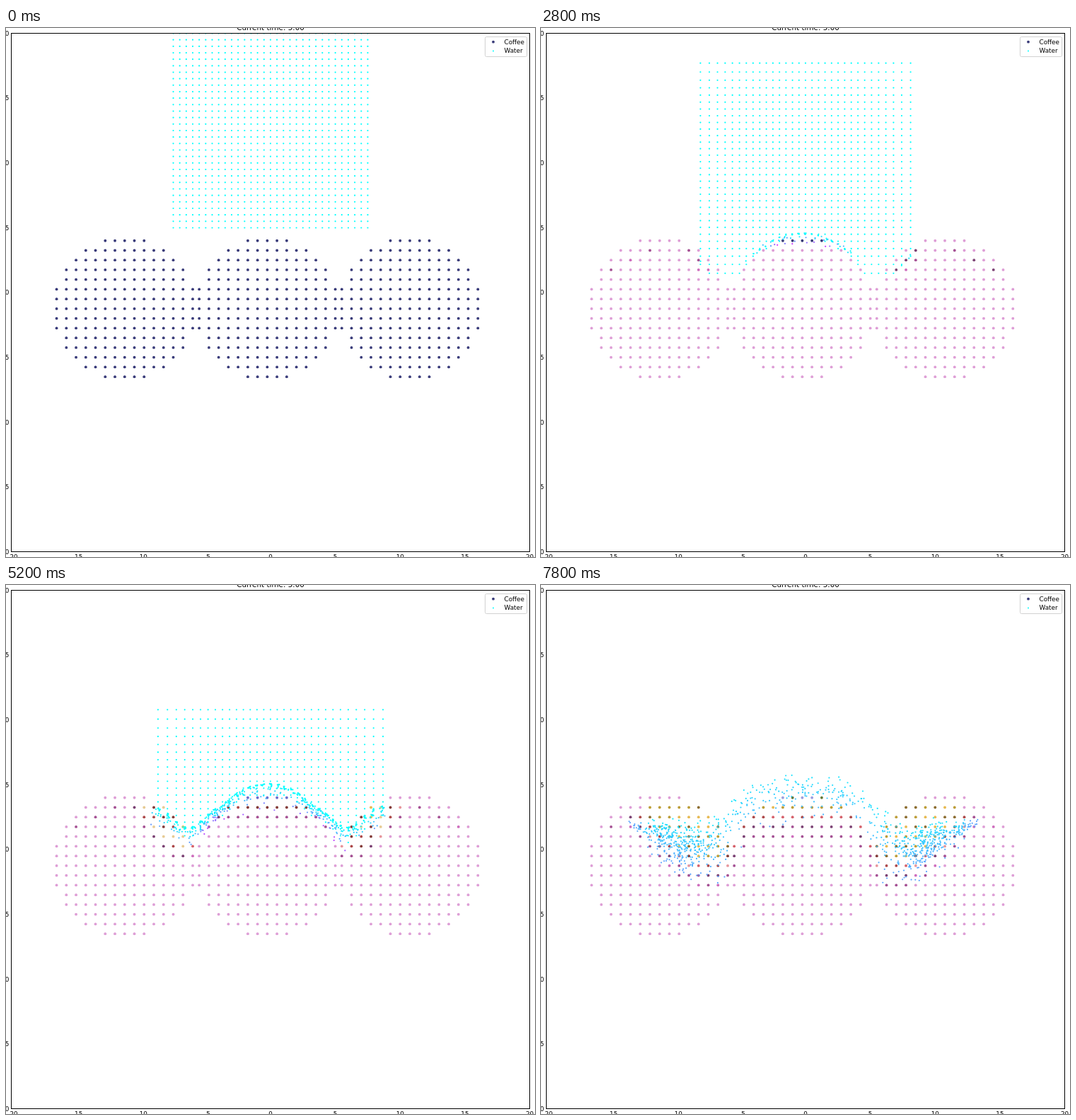
An HTML page with a canvas for the animation above (8000 ms loop, 748 px wide and 748 px high).

```html
<!DOCTYPE html>
<html lang="en">
<head>
<meta charset="utf-8">
<title>Coffee and water particles</title>
<style>
  html, body { margin: 0; width: 100%; height: 100%; overflow: hidden; background: #fff; }
  canvas, svg { position: absolute; left: 0; top: 0; width: 748px; height: 748px; }
  text { font: 8.8px "DejaVu Sans", sans-serif; }
  .title { font-size: 10.4px; }
</style>
</head>
<body>
<canvas id="stage" width="748" height="748"></canvas>
<svg id="axes" viewBox="0 0 748 748">
  <rect x="7.5" y="7.5" width="733" height="733" fill="none" stroke="#000"/>
  <text class="title" x="374" y="2.5" text-anchor="middle">Current time: 5.00</text>
  <rect x="677.5" y="12.5" width="59" height="28" rx="2" fill="#fff" fill-opacity=".8" stroke="#ccc" stroke-width=".9"/>
  <circle cx="689" cy="19.7" r="1.9" fill="#393b79"/>
  <circle cx="689" cy="32.6" r="1" fill="#0ff"/>
  <text x="704.5" y="22.7">Coffee</text>
  <text x="704.5" y="35.2">Water</text>
</svg>
<script>
const STEP = 200, LOOP = 8000, UNIT = 18.33, MID = 374, CREST = 370, END = 7.8;
const PALETTE = ('393b79 5254a3 6b6ecf 9c9ede 637939 8ca252 b5cf6b cedb9c 8c6d31 bd9e39 ' +
  'e7ba52 e7cb94 843c39 ad494a d6616b e7969c 7b4173 a55194 ce6dbd de9ed6').split(' ').map(c => '#' + c);
const ctx = document.getElementById('stage').getContext('2d');
const clamp = (v, lo = 0, hi = 1) => Math.min(hi, Math.max(lo, v));
const mix = (a, b, k) => a + (b - a) * k;
const bell = v => Math.exp(-v * v);
const offset = x => Math.abs(x - CREST);
const rebound = t => Math.max(0, t - 4.4);

let seed = 7;
function random() {
  seed = (seed * 1664525 + 1013904223) % 4294967296;
  return seed / 4294967296;
}

// Top of the disturbed water: a dome that swells and a valley that fills.
function upper(d, t) {
  const g = rebound(t);
  const top = 290 - 10 * g - 2 * g * g;
  const dome = mix(top, 311, clamp(d / (60 + 7 * g * g)) ** 2);
  return dome + 58 * clamp(1 - g / 1.8) * bell((d - 112) / 30) + Math.max(0, d - 200) / 2;
}

// How deep the water has soaked in, with a lobe growing on each side.
function lower(d, t) {
  const g = rebound(t), out = d - 115;
  const lobe = out < 0 ? bell(out / 25) : 1 - (out / (55 + 18 * g)) ** 2;
  return Math.max(upper(d, t), 284 + 9.5 * t + (55 + 5 * g) * lobe);
}

// Untouched block: falls under gravity while its rims spread apart.
function spread(k, t) {
  const reach = .4 + .82 * t;
  return 4.4 * t * t / (t + .3) * (Math.exp((k - 30) / reach) - Math.exp(-k / reach));
}
function falling(col, row, t) {
  return {
    x: MID + (col - 15) * UNIT / 2 + spread(col, t),
    y: 282.5 - row * UNIT / 2 + 7.34 * Math.max(0, t - .107) ** 2 - spread(row, t)
  };
}

function makeDrop(col, row) {
  let hit = 1, at;
  do {
    hit += STEP / 1000;
    at = falling(col, row, hit);
  } while (at.y <= upper(offset(at.x), hit) && hit < END);
  const u = (col - 14.5 - random()) / 15;
  const domeShare = .08 + .52 * (row / 30) ** 2;
  const lobe = 105 + 145 * (random() + random()) / 2;
  return {
    col, row, hit, from: at.x,
    to: CREST + (Math.abs(u) > domeShare ? Math.sign(u) * lobe : 125 * u / domeShare),
    depth: .65 + .45 * random(),
    jx: random() - .5,
    jy: random() - .5
  };
}
const water = Array.from({ length: 961 }, (_, n) => makeDrop(n % 31, Math.floor(n / 31)));

function drawDot(x, y, r, color) {
  ctx.fillStyle = color;
  ctx.beginPath();
  ctx.arc(x, y, r, 0, 7);
  ctx.fill();
}

const cool = v => `rgb(${255 * v},${255 * (1 - v)},255)`;

function drawDrop(p, t) {
  if (t < p.hit) {
    const at = falling(p.col, p.row, t);
    drawDot(at.x, at.y, 1.1, '#0ff');
    return;
  }
  const g = rebound(t), age = t - p.hit, fresh = Math.min(1, age);
  const go = clamp(age / Math.max(.2, END - p.hit)) ** 2;
  const x = mix(p.from, p.to, go) + p.jx * 7 * fresh;
  const d = offset(x);
  const depth = p.depth * (age / (t - 1)) ** (2 - .42 * g);
  const y = mix(upper(d, t), lower(d, t), depth) + p.jy * 7 * fresh;
  const rim = fresh * clamp((d - 145 - 18 * g) / 30);
  drawDot(x, y, 1.1, cool((.85 - .145 * g) * Math.max(clamp(depth * 1.25 - .06), rim)));
}

const coffee = [];
for (const center of [-11.25, -.25, 10.75]) {
  for (let j = -7; j <= 7; j++) {
    for (let i = -7; i <= 7; i++) {
      if (i * i + j * j > 53) continue;
      coffee.push({
        x: MID + (center + .75 * i) * UNIT,
        y: MID + (1.25 + .75 * j) * UNIT,
        first: center === -.25 && j === -7,
        noise: random()
      });
    }
  }
}

// Palette index: 19 is full strength, 0 is washed out.
function strengthLeft(c, t) {
  if (t < .1 || c.first && t < 4) return 0;
  const d = offset(c.x);
  const soaked = lower(d, t) - c.y;
  const reached = c.y < falling(15, 0, t).y - 4;
  if (!reached || soaked <= 0 || c.y < upper(d, t) - 10) return 19;
  const least = d > 100 ? Math.max(8, 22 - 2.2 * t) + 3 * c.noise : 0;
  return Math.floor(clamp(18.4 - 2 * soaked ** 2 / t ** 3 - c.noise, Math.min(18, least), 18));
}

function buildLabels() {
  let labels = '';
  for (let v = -20; v <= 20; v += 5) {
    const name = String(v).replace('-', '\u2212');
    labels += `<text x="${MID + v * UNIT}" y="750.5" text-anchor="middle">${name}</text>` +
      `<text x="4.4" y="${MID - v * UNIT + 3.2}" text-anchor="end">${name}</text>`;
  }
  document.getElementById('axes').insertAdjacentHTML('beforeend', labels);
}

let shown = -1;
function frame(now) {
  const step = Math.floor(now % LOOP / STEP);
  if (step !== shown) {
    shown = step;
    const t = step * STEP / 1000;
    ctx.clearRect(0, 0, 748, 748);
    for (const c of coffee) drawDot(c.x, c.y, 1.95, PALETTE[strengthLeft(c, t)]);
    for (const p of water) drawDrop(p, t);
  }
  requestAnimationFrame(frame);
}

ctx.beginPath();
ctx.rect(7.5, 7.5, 733, 733);
ctx.clip();
buildLabels();
requestAnimationFrame(frame);
</script>
</body>
</html>
```
